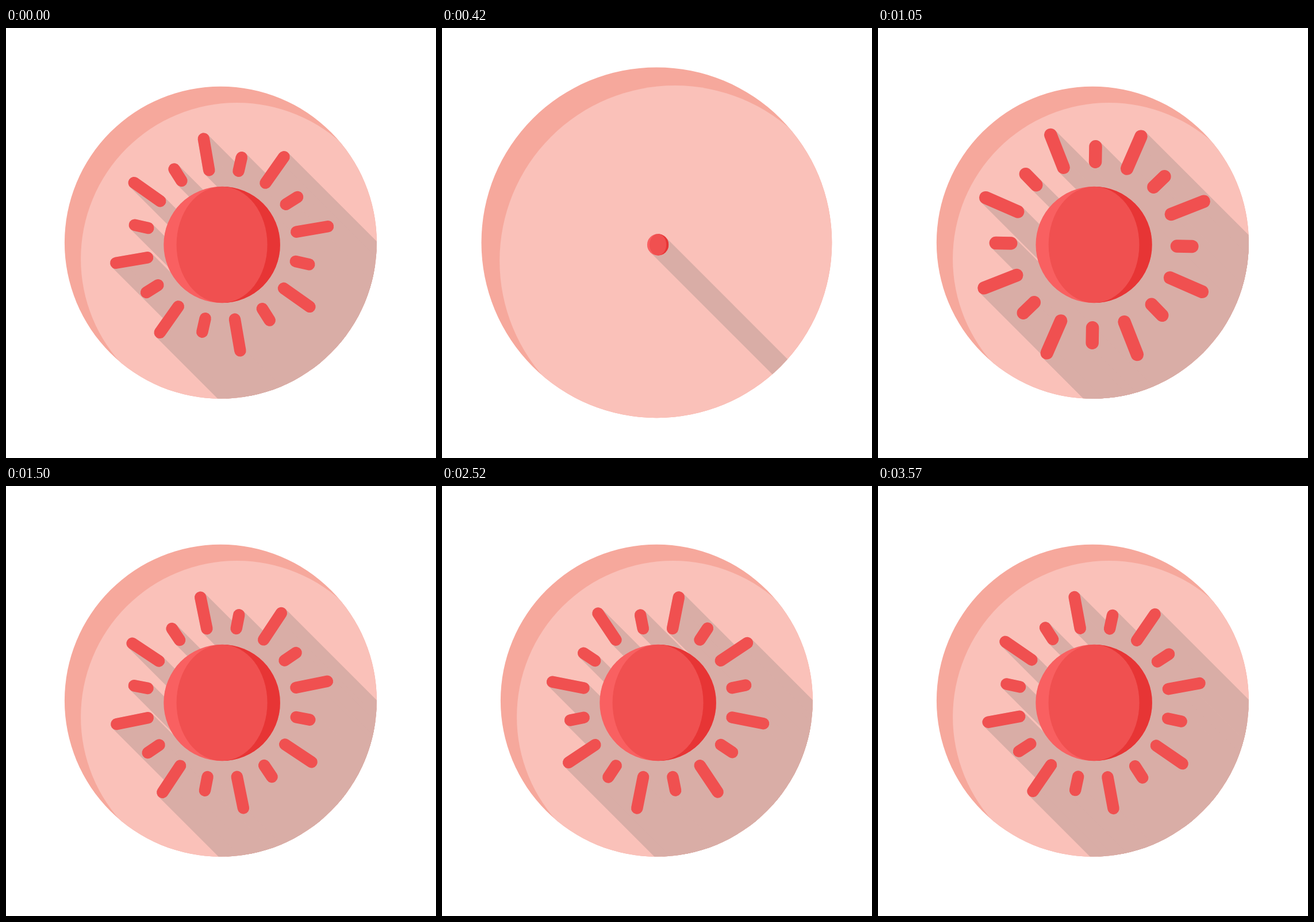
Recreate the animation shown at these times as an HTML page with a canvas. Size 748 by 748 pixels, loop 3600 ms.

```html
<!DOCTYPE html>
<html lang="en">
<head>
<meta charset="utf-8">
<title>Sun</title>
<style>
  html, body { margin: 0; width: 100%; height: 100%; overflow: hidden; background: #fff; }
  canvas { display: block; }
</style>
</head>
<body>
<canvas width="748" height="748"></canvas>
<script>
const ctx = document.querySelector('canvas').getContext('2d');
const TAU = Math.PI * 2;
const LOOP = 3600, PULSE = 420, RAY_PEAK = 1050, RAY_REST = 1500;
const DISC = { x: 373.4, y: 373.3, r: 271.5 };
const SUN = { x: 375.6, y: 377, r: 101.3 };
const RED = '#f05050', SHADOW = '#d9ada6';
const FAR = 700;

const clamp = v => Math.min(1, Math.max(0, v));
const smooth = v => (1 - Math.cos(Math.PI * clamp(v))) / 2;
const easeOut = v => 1 - (1 - clamp(v)) ** 3;

// 0 at rest, 1 when the disc is largest and the sun smallest
const pulse = t => t < PULSE ? smooth(t / PULSE) : 1 - easeOut((t - PULSE) / 720);

function rayScale(t) {
  if (t < PULSE) return 1 - smooth(t / (PULSE - 30));
  if (t < RAY_PEAK) return 1.098 * easeOut((t - PULSE) / (RAY_PEAK - PULSE));
  return 1.098 - 0.098 * smooth((t - RAY_PEAK) / (RAY_REST - RAY_PEAK));
}

function ellipse(x, y, rx, ry, color) {
  ctx.beginPath();
  ctx.ellipse(x, y, rx, ry, 0, 0, TAU);
  ctx.fillStyle = color;
  ctx.fill();
}

function stroke(points, width, color, closed) {
  ctx.beginPath();
  points.forEach(p => ctx.lineTo(...p));
  ctx.lineWidth = width;
  ctx.strokeStyle = ctx.fillStyle = color;
  if (closed) {
    ctx.closePath();
    ctx.fill();
  }
  ctx.stroke();
}

function makeRays(t) {
  const scale = rayScale(t);
  if (scale < 0.01) return [];
  // The turn carries on through the loop and restarts while the rays are hidden
  const turn = 0.1 + 22.25 * (t < PULSE ? t + LOOP : t) / 1000;
  return Array.from({ length: 16 }, (_, i) => {
    const angle = (turn + i * 22.5 - 90) * Math.PI / 180;
    const at = r => [SUN.x + Math.cos(angle) * r * scale, SUN.y + Math.sin(angle) * r * scale];
    return { inner: at(131.5), outer: at(i % 2 ? 155.5 : 187), width: 20.5 * scale };
  });
}

function drawDisc(r) {
  const shift = r * 0.104;
  ellipse(DISC.x, DISC.y, r, r, '#f6a89c');
  ctx.clip();
  ellipse(DISC.x + shift, DISC.y + shift, r, r, '#fac1b9');
}

function drawShadows(rays, sunRadius) {
  const away = ([x, y]) => [x + FAR, y + FAR];
  for (const { inner, outer, width } of rays)
    stroke([inner, outer, away(outer), away(inner)], width, SHADOW, true);
  const center = [SUN.x, SUN.y];
  stroke([center, away(center)], sunRadius * 2, SHADOW);
}

function drawSun(r) {
  ctx.save();
  ellipse(SUN.x, SUN.y, r, r, '#f96061');
  ctx.clip();
  ctx.fillStyle = '#e73535';
  ctx.fillRect(SUN.x, SUN.y - r, r, r * 2);
  ellipse(SUN.x, SUN.y, r * 0.78, r, RED);
  ctx.restore();
}

function draw(t) {
  const p = pulse(t), sunRadius = SUN.r * (1 - 0.819 * p), rays = makeRays(t);
  ctx.clearRect(0, 0, 748, 748);
  ctx.lineCap = ctx.lineJoin = 'round';
  ctx.save();
  drawDisc(DISC.r * (1 + 0.1235 * p));
  drawShadows(rays, sunRadius);
  ctx.restore();
  for (const { inner, outer, width } of rays) stroke([inner, outer], width, RED);
  drawSun(sunRadius);
}

const start = performance.now();
function frame() {
  draw((performance.now() - start) % LOOP);
  requestAnimationFrame(frame);
}
frame();
</script>
</body>
</html>
```
